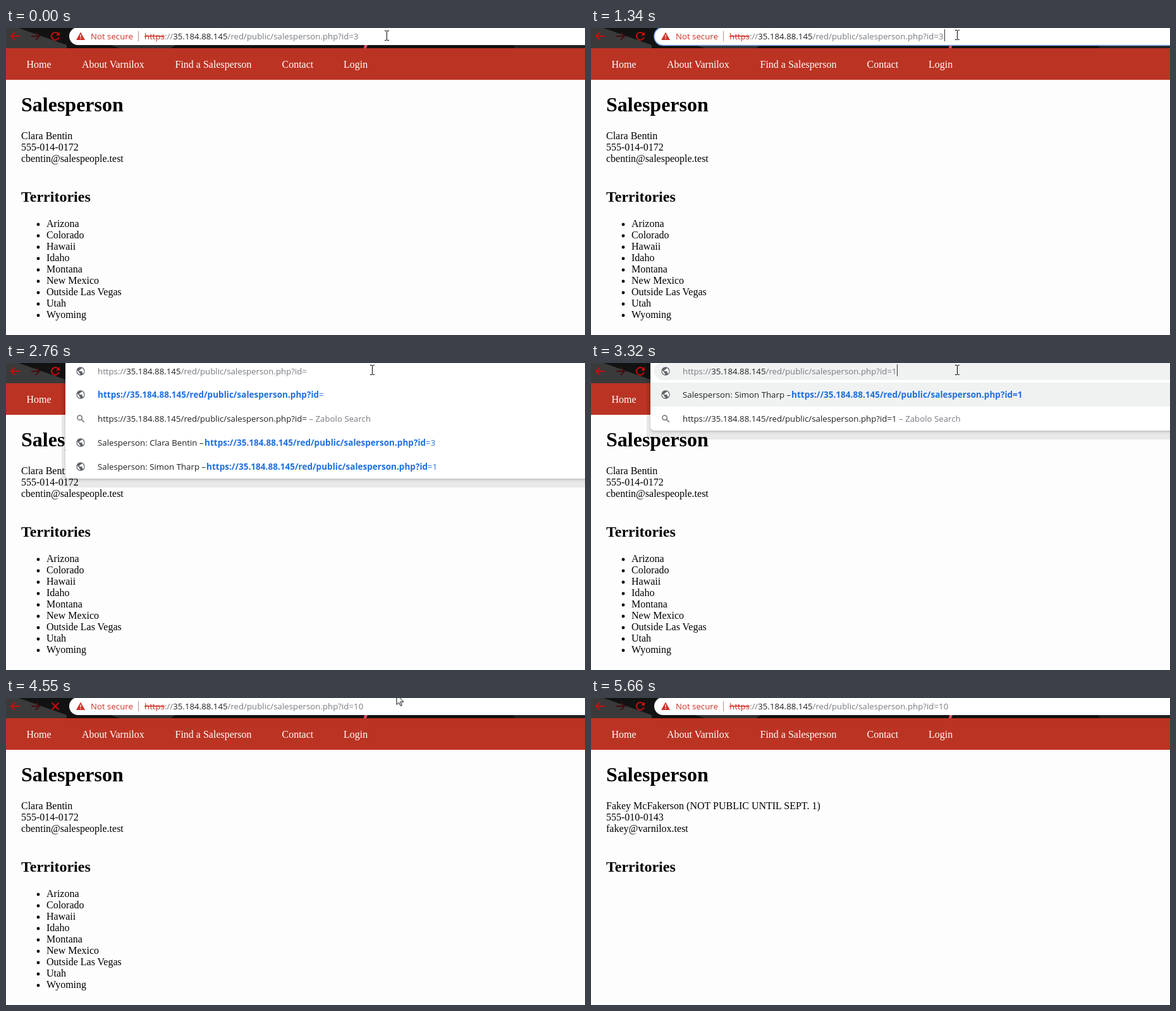
Animation of 916x486 px, one loop 6500 ms. Source, as an HTML page:

```html
<!DOCTYPE html>
<html lang="en">
<head>
<meta charset="utf-8">
<title>Salesperson page</title>
<style>
html, body { margin: 0; width: 100%; height: 100%; overflow: hidden; background: #fdfdfd; }
svg { display: block; width: 916px; height: 486px; }
text { white-space: pre; }

.page { font: 16px "Liberation Serif", "Times New Roman", serif; }
.page .h1 { font-size: 32px; font-weight: bold; }
.page .h2 { font-size: 24px; font-weight: bold; }
.nav { fill: #fff; }

.ui { font: 13.26px "Open Sans", "Noto Sans", sans-serif; fill: #202124; }
.dim { fill: #777b80; }
.host { fill: #202124; }
.warn { fill: #d02f25; }
.strike { fill: #d02f25; text-decoration: line-through; }
.sel, .sel tspan { fill: #fff; }
.link { fill: #1f6fe0; }
.link .b { font-size: 13.55px; font-weight: 700; }

.popup { fill: #fff; filter: drop-shadow(0 2px 2px rgba(0, 0, 0, .2)); }
.shade { fill: rgba(0, 0, 0, .08); }
.hot { fill: #f0f2f2; }
.line { fill: none; stroke-width: 2; }

/* Layers switch on and off along one 6.5 s timeline */
[class^="t-"] { animation: 6.5s step-end infinite; }
.t-focus { animation-name: focus; }
.t-plain { animation-name: plain; }
.t-unsafe { animation-name: unsafe; }
.t-edit { animation-name: edit; }
.t-empty { animation-name: empty; }
.t-one { animation-name: one; }
.t-ten { animation-name: ten; }
.t-load { animation-name: load; }
.t-done { animation-name: done; }
.t-list { animation-name: list; }
.t-match { animation-name: one; }
.t-short { animation-name: short; }
.t-ring { animation-name: ring; }
.t-ready { animation-name: ready; }
.t-stop { animation-name: stop; }
.t-old { animation-name: old; }
.t-new { animation-name: new; }
.t-caret { animation-name: caret; }
.t-beam { animation-name: beam; }
.t-arrow { animation-name: arrow; }

@keyframes focus { 0%, 18.615% { opacity: 0 } 6.153% { opacity: 1 } }
@keyframes plain { 0%, 18.615% { opacity: 1 } 6.153%, 33.846% { opacity: 0 } }
@keyframes ring { 0%, 33.846% { opacity: 0 } 6.153% { opacity: 1 } }
@keyframes unsafe { 0%, 63.692% { opacity: 1 } 33.846% { opacity: 0 } }
@keyframes edit { 0%, 59.538% { opacity: 0 } 33.846% { opacity: 1 } }
@keyframes empty { 0%, 51.076% { opacity: 0 } 33.846% { opacity: 1 } }
@keyframes one { 0%, 55.23% { opacity: 0 } 51.076% { opacity: 1 } }
@keyframes ten { 0%, 59.538% { opacity: 0 } 55.23% { opacity: 1 } }
@keyframes load { 0%, 63.692% { opacity: 0 } 59.538% { opacity: 1 } }
@keyframes done { 0% { opacity: 0 } 63.692% { opacity: 1 } }
@keyframes list { 0%, 51.076% { opacity: 0 } 36.153% { opacity: 1 } }
@keyframes short { 0%, 61.846% { opacity: 0 } 55.23% { opacity: 1 } }
@keyframes ready { 0%, 74.307% { opacity: 1 } 59.538% { opacity: 0 } }
@keyframes stop { 0%, 74.307% { opacity: 0 } 59.538% { opacity: 1 } }
@keyframes old { 0% { opacity: 1 } 72.307% { opacity: 0 } }
@keyframes new { 0% { opacity: 0 } 72.307% { opacity: 1 } }
@keyframes caret {
  0%, 27.692%, 42.461%, 59.538% { opacity: 0; transform: none }
  18.615% { opacity: 1; transform: translateX(559px) }
  33.846% { opacity: 1; transform: translateX(477px) }
  51.076% { opacity: 1; transform: translateX(484px) }
  55.23% { opacity: 1; transform: translateX(492px) }
}
@keyframes beam {
  0%, 6.153% { opacity: 1; transform: translate(602px, 12px) }
  1.846%, 10.307%, 70% { opacity: 0; transform: none }
  8.153% { opacity: 1; transform: translate(595px, 22px) }
  14.461% { opacity: 1; transform: translate(580px, 12px) }
  20.615% { opacity: 1; transform: translate(579px, 11px) }
}
@keyframes arrow {
  0%, 14.461%, 74.307% { opacity: 0; transform: none }
  10.307% { opacity: 1; transform: translate(586px, 28.5px) }
  70% { opacity: 1; transform: translate(618px, -5.5px) }
  72.307% { opacity: 1; transform: translate(621px, -11px) }
}
</style>
</head>
<body>
<svg viewBox="0 0 916 486">
  <defs>
    <g id="globe">
      <circle r="6.7" fill="#5f6368"/>
      <path transform="scale(.67)" d="M-1 7.9C-6 7.3-9 2.5-7.8-1.8L-3 3V4L-1 6ZM6.9 5.4L5 4H4V1L3 0H-4V-2H-2L-1-3V-5H1L3-7V-7.4C8-5.3 9.5 1.5 6.9 5.4Z" fill="#fff"/>
    </g>
    <g id="lens" class="line" stroke="#6b6f74" style="stroke-width:1.5">
      <circle cx="-1.4" cy="-1.4" r="3.7"/>
      <path d="M1.4 1.4L5.8 5.8"/>
    </g>
    <circle id="dot" cx="51" r="2.4"/>
    <g id="panel">
      <path class="shade" d="M88 0H916V121H88Z"/>
      <rect class="popup" x="94" y="-10" width="840" height="117" rx="6"/>
      <rect class="hot" x="100" y="-1" width="830" height="28" rx="14"/>
      <rect class="hot" x="94" y="31" width="822" height="38"/>
      <use href="#globe" x="118" y="50"/>
      <use href="#lens" x="118" y="88"/>
    </g>
  </defs>

  <rect width="916" height="486" fill="#fdfdfd"/>

  <!-- Browser bar -->
  <rect width="916" height="32" fill="#121212"/>
  <path d="M0 0H20L96 27V32H0Z" fill="#3a3a3b"/>
  <path d="M165 27H268L261 32H180Z" fill="#303031"/>
  <path d="M567 27H572L570 32H566Z" fill="#e25068"/>
  <path d="M804 27H916V32H804Z" fill="#222"/>
  <g class="line" stroke="#c90d0d">
    <path d="M22 13H8M14 7L8 13L14 19"/>
    <path d="M40 13H53M47 7L53 13L47 19" stroke="#460d0e"/>
    <g class="t-ready">
      <path d="M82.5 9A6 6 0 1 0 83.8 14.5"/>
      <path d="M85 6V12H79Z" fill="#c90d0d" stroke="none"/>
    </g>
    <path class="t-stop" d="M72.5 7.5L83.5 18.5M83.5 7.5L72.5 18.5"/>
  </g>
  <rect x="100" y="-1" width="830" height="28" rx="14" fill="#fff"/>
  <rect class="t-ring" x="100" y="-1" width="830" height="28.5" rx="14" fill="none" stroke="#79a7ee" stroke-width="1.5"/>

  <!-- Web page -->
  <rect y="32" width="916" height="50" fill="#bb3323"/>
  <g class="page">
    <g class="nav">
      <text x="32.5" y="63">Home</text>
      <text x="120" y="63">About Varnilox</text>
      <text x="267.5" y="63">Find a Salesperson</text>
      <text x="436.5" y="63">Contact</text>
      <text x="534" y="63">Login</text>
    </g>
    <text class="h1" x="24" y="132">Salesperson</text>
    <text class="h2" x="24" y="275">Territories</text>
    <g class="t-old">
      <text x="24" y="176">Clara Bentin</text>
      <text x="24" y="194">555-014-0172</text>
      <text x="24" y="212">cbentin@salespeople.test</text>
      <text y="315"><tspan x="64">Arizona</tspan><tspan x="64" dy="18">Colorado</tspan><tspan x="64" dy="18">Hawaii</tspan><tspan x="64" dy="18">Idaho</tspan><tspan x="64" dy="18">Montana</tspan><tspan x="64" dy="18">New Mexico</tspan><tspan x="64" dy="18">Outside Las Vegas</tspan><tspan x="64" dy="18">Utah</tspan><tspan x="64" dy="18">Wyoming</tspan></text>
      <use href="#dot" y="311"/><use href="#dot" y="329"/><use href="#dot" y="347"/>
      <use href="#dot" y="365"/><use href="#dot" y="383"/><use href="#dot" y="401"/>
      <use href="#dot" y="419"/><use href="#dot" y="437"/><use href="#dot" y="455"/>
    </g>
    <g class="t-new">
      <text x="24" y="176">Fakey McFakerson (NOT PUBLIC UNTIL SEPT. 1)</text>
      <text x="24" y="194">555-010-0143</text>
      <text x="24" y="212">fakey@varnilox.test</text>
    </g>
  </g>

  <g class="ui">
    <!-- Suggestions -->
    <g class="t-list">
      <path class="shade" d="M88 0H916V197H88Z"/>
      <rect class="popup" x="94" y="-10" width="840" height="193" rx="6"/>
      <use href="#globe" x="118" y="50"/>
      <text class="link" x="145" y="55"><tspan class="b">https://35.184.88.145/red/public/salesperson.php?id</tspan>=</text>
      <use href="#lens" x="118" y="88"/>
      <text x="145" y="93">https://35.184.88.145/red/public/salesperson.php?id=<tspan class="dim"> – Zabolo Search</tspan></text>
      <use href="#globe" x="118" y="126"/>
      <text x="145" y="131">Salesperson: Clara Bentin – </text>
      <text class="link" x="314" y="131"><tspan class="b">https://35.184.88.145/red/public/salesperson.php?id</tspan>=3</text>
      <use href="#globe" x="118" y="164"/>
      <text x="145" y="169">Salesperson: Simon Tharp – </text>
      <text class="link" x="317" y="169"><tspan class="b">https://35.184.88.145/red/public/salesperson.php?id</tspan>=1</text>
    </g>
    <g class="t-match">
      <use href="#panel"/>
      <text x="145" y="55">Salesperson: Simon Tharp – </text>
      <text class="link" x="317" y="55"><tspan class="b">https://35.184.88.145/red/public/salesperson.php?id=1</tspan></text>
      <text x="145" y="93">https://35.184.88.145/red/public/salesperson.php?id=1<tspan class="dim"> – Zabolo Search</tspan></text>
    </g>
    <g class="t-short">
      <use href="#panel"/>
      <text class="link" x="145" y="55"><tspan class="b">https://35.184.88.145/red/public/salesperson.php?id</tspan>=<tspan class="b">10</tspan></text>
      <text x="145" y="93">https://35.184.88.145/red/public/salesperson.php?id=10<tspan class="dim"> – Zabolo Search</tspan></text>
    </g>

    <!-- Address field -->
    <g class="t-unsafe">
      <path d="M118 6.5L125 19H111Z" fill="#d02f25"/>
      <path d="M118 10.5V14.5M118 15.8V17.3" stroke="#fff" stroke-width="1.4"/>
      <text class="warn" x="134" y="18">Not secure</text>
      <path d="M209.5 5V21" stroke="#c08a88"/>
    </g>
    <g class="t-plain">
      <text class="dim" x="219" y="18"><tspan class="strike">https</tspan>://<tspan class="host">35.184.88.145</tspan>/red/public/salesperson.php?id=3</text>
    </g>
    <g class="t-focus">
      <rect x="219" y="2" width="340" height="22" fill="#3297fd"/>
      <text class="sel" x="219" y="18"><tspan class="strike">https</tspan>://35.184.88.145/red/public/salesperson.php?id=3</text>
    </g>
    <g class="t-edit"><use href="#globe" x="118" y="13"/></g>
    <g class="t-empty">
      <text class="dim" x="145" y="18">https://<tspan class="host">35.184.88.145</tspan>/red/public/salesperson.php?id=</text>
    </g>
    <g class="t-one">
      <text class="dim" x="145" y="18">https://<tspan class="host">35.184.88.145</tspan>/red/public/salesperson.php?id=1</text>
    </g>
    <g class="t-ten">
      <text class="dim" x="145" y="18">https://<tspan class="host">35.184.88.145</tspan>/red/public/salesperson.php?id=10</text>
    </g>
    <g class="t-load">
      <circle cx="118" cy="13" r="6" fill="none" stroke="#5f6368" stroke-width="1.4"/>
      <path d="M118 9.3V10.8M118 12V16.7" stroke="#5f6368" stroke-width="1.5"/>
      <text class="dim" x="134" y="18">https://<tspan class="host">35.184.88.145</tspan>/red/public/salesperson.php?id=10</text>
    </g>
    <g class="t-done">
      <text class="dim" x="219" y="18"><tspan class="strike">https</tspan>://<tspan class="host">35.184.88.145</tspan>/red/public/salesperson.php?id=10</text>
    </g>
  </g>

  <!-- Caret and pointers -->
  <g class="t-caret"><rect y="2" width="1" height="19" fill="#333"/></g>
  <g class="t-beam"><path d="M-3-7.5H0M1-7.5H4M.5-7V7M-3 7.5H0M1 7.5H4" stroke="#000" fill="none"/></g>
  <g class="t-arrow"><path d="M0 0V16L3.7 12.6L6.2 18L8.4 17L6 11.7H11Z" fill="#fff" stroke="#000"/></g>
</svg>
</body>
</html>
```
